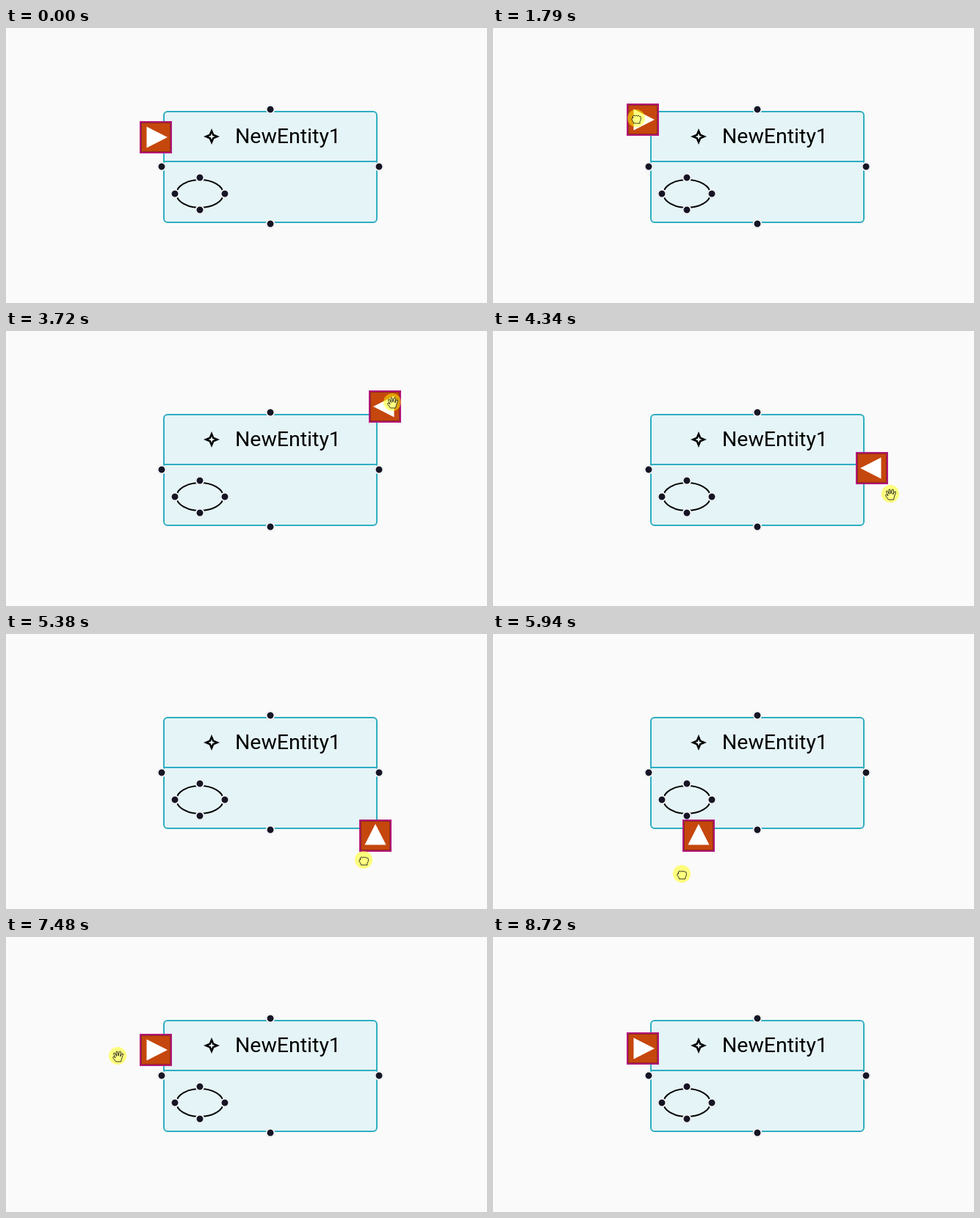
An HTML page for the animation above (9.06 s loop, 655 by 375 pixels).

```html
<!DOCTYPE html>
<html lang="en">
<head>
<meta charset="utf-8">
<title>Port dragged around an entity</title>
<style>
  html, body { margin: 0; width: 100%; height: 100%; overflow: hidden; background: #fafafa; }
  svg { display: block; width: 100vw; height: 100vh; }
  text { font: 28.5px Roboto, Arial, sans-serif; }
</style>
</head>
<body>
<svg viewBox="0 0 655 375">
  <rect width="655" height="375" fill="#fafafa"/>
  <g stroke="#2eaec1" stroke-width="2">
    <rect x="215" y="114" width="290" height="151" rx="5" fill="#e5f4f7"/>
    <path d="M215 182H505"/>
  </g>
  <path transform="translate(280 148)" fill-rule="evenodd"
    d="M0-11L3.2-3.2 11 0 3.2 3.2 0 11-3.2 3.2-11 0-3.2-3.2ZM0-4.5L-1.2-1.2-4.5 0-1.2 1.2 0 4.5 1.2 1.2 4.5 0 1.2-1.2Z"/>
  <text x="312" y="157">NewEntity1</text>
  <ellipse cx="264" cy="226" rx="32" ry="19" fill="none" stroke="#000" stroke-width="2"/>
  <g id="dots" fill="#151525" stroke="#fff" stroke-width="1.4"></g>
  <g id="port">
    <rect x="-22" y="-22" width="44" height="44" fill="#b5177a"/>
    <rect x="-19.5" y="-19.5" width="39" height="39" fill="#c5470d" stroke="#8a2a14"/>
    <path id="arrow" d="M-12.5-14.5L16 0-12.5 14.5Z" fill="#fff"/>
  </g>
  <g id="cursor">
    <circle id="glow" fill="#ff0" fill-opacity=".5"/>
    <path id="hand" transform="translate(.5 1)" stroke="#222" stroke-width=".9" stroke-linejoin="round"/>
  </g>
</svg>
<script>
const LOOP = 9060, STEP = 70, LAG = 60;
const PRESS = 1100, RELEASE = 7820, GRIP = 10, BOW = 0.04;
const LEFT = 204, RIGHT = 516, TOP = 103, BOTTOM = 275;
const ORIGIN = [393, 319];
const FIST = "M-4 6Q-4 4-5.5 2.5Q-7.5 0-6-1.5L-5-1V-4Q-3.5-6-2-4Q-.5-6 1-4Q2.5-5.5 4-3.5Q6-4 6-1.5Q6 2 4.5 3.5V6Z";
const PALM = "M-3 7L-7 1.5Q-7-.5-5 .5L-3.5 2-6-4Q-5.5-6-4-4.5L-2-.5-2.5-6.5Q-1.5-8-.5-6.5L.3-1 2-7Q3.5-7.5 4-6L3 0 5.5-4Q7-4.5 7-3L5 3 4 7Z";

// cursor strokes: start, end, goal x and y, skew of the easing, hand shape
const strokes = [
  [190, 1030, 200, 159, 1, PALM],
  [1300, 2070, 196, 98, 1.9, FIST],
  [2290, 3520, 526, 97, 0.9, FIST],
  [3720, 4770, 538, 298, 1.4, PALM],
  [5030, 6500, 181, 323, 1, FIST],
  [6700, 7620, 152, 162, 0.82, PALM],
  [8020, 8720, 590, 396, 1, PALM]
];

const $ = id => document.getElementById(id);
const clamp = (v, lo, hi) => Math.min(hi, Math.max(lo, v));
const ease = u => u * u * u * (10 + u * (6 * u - 15));
const move = (id, x, y) => $(id).setAttribute("transform", `translate(${Math.round(x)} ${Math.round(y)})`);

const around = (x, y, rx, ry) => [[x, y - ry], [x - rx, y], [x + rx, y], [x, y + ry]];
$("dots").innerHTML = [...around(360, 189, 148, 78), ...around(264, 226, 34, 22)].map(([x, y]) =>
  `<circle cx="${x}" cy="${y}" r="6.3" fill="#d3dcdf" stroke="none"/><circle cx="${x}" cy="${y}" r="5.2"/>`).join("");

const strokeAt = t => strokes.findLast(s => s[0] <= t) || strokes[0];

// the picture advances in steps that end with each stroke
function stepped(t) {
  const [start, end] = strokeAt(t);
  const left = Math.max(0, Math.ceil((end - t - 10) / STEP));
  return Math.max(start, end - STEP * left);
}

// each stroke bends slightly to the left of its direction
function pointer(t) {
  let [x, y] = ORIGIN;
  for (const [start, end, gx, gy, skew] of strokes) {
    const u = clamp((t - start + STEP) / (end - start), 0, 1);
    if (u === 0) break;
    const e = ease(u ** skew), bend = BOW * Math.sin(Math.PI * e);
    const dx = gx - x, dy = gy - y;
    x += dx * e + dy * bend;
    y += dy * e - dx * bend;
  }
  return [x, y];
}

// the port trails the cursor and stays on the border
function port(t) {
  const [x, y] = pointer(clamp(t - LAG, PRESS, RELEASE));
  return [clamp(x, LEFT, RIGHT), clamp(y - GRIP, TOP, BOTTOM)];
}

function turn([x, y]) {
  if (x <= LEFT) return 0;
  if (x >= RIGHT) return 180;
  return y <= TOP ? 90 : -90;
}

function draw(t) {
  const q = stepped(t), place = port(q);
  const pressed = t >= PRESS && t < RELEASE;
  move("port", ...place);
  move("cursor", ...pointer(q));
  $("arrow").setAttribute("transform", `rotate(${turn(place)})`);
  $("cursor").setAttribute("visibility", t >= 190 && t < 8720 ? "visible" : "hidden");
  $("glow").setAttribute("r", !pressed ? 0 : t < 1300 ? 9 : 12);
  $("hand").setAttribute("d", strokeAt(t)[5]);
  $("hand").setAttribute("fill", pressed ? "#ffff80" : "#fff");
}

const begin = performance.now();
function frame() {
  draw((performance.now() - begin) % LOOP);
  requestAnimationFrame(frame);
}
frame();
</script>
</body>
</html>
```
